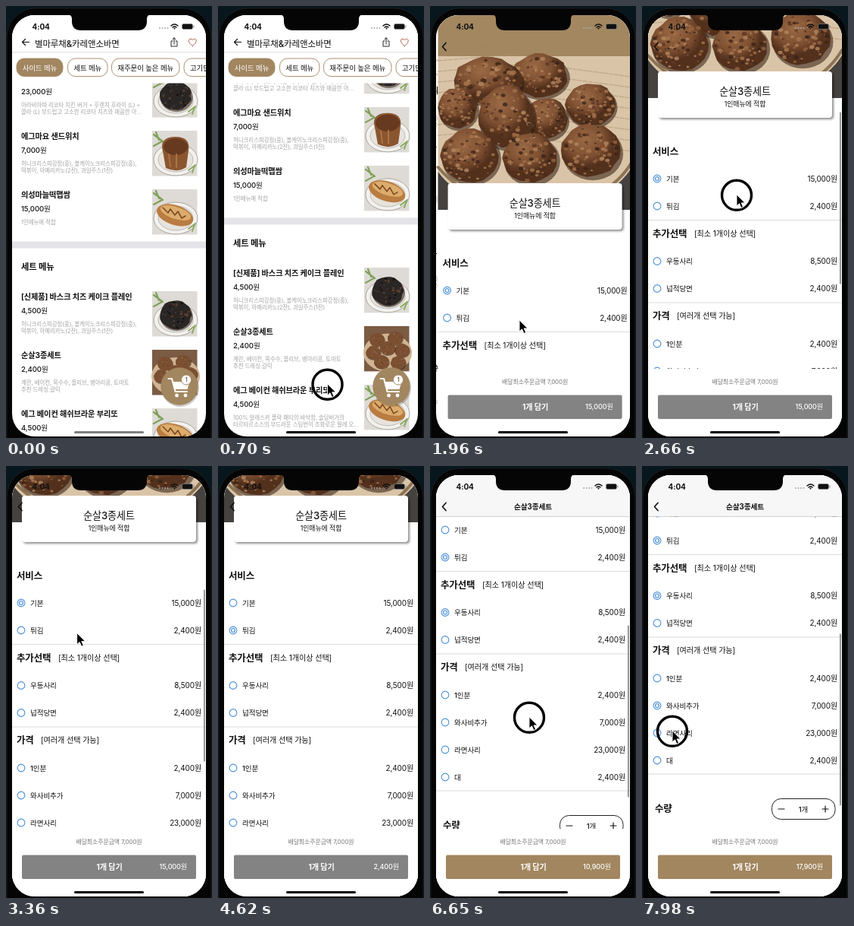
Animation, 272 px wide and 568 px high, one loop 8000 ms. Source, as an HTML page:

```html
<!DOCTYPE html>
<html lang="ko">
<head>
<meta charset="utf-8">
<title>메뉴 주문</title>
<style>
html, body { margin: 0; width: 100%; height: 100%; overflow: hidden; background: #08161d; }
svg { display: block; width: 272px; height: 568px; }
text { font-family: Inter, "Noto Sans CJK KR", "Noto Sans CJK", sans-serif; letter-spacing: -.01em; }
</style>
</head>
<body>
<svg id="stage" viewBox="0 0 272 568" xmlns="http://www.w3.org/2000/svg"></svg>
<script>
const LOOP = 8000, STEP = 70;
const BROWN = '#a1865f', BLUE = '#4a8fd8', PUSH_AT = 1592;
const TYPE_SCALE = .948; // Noto's Hangul is wider than the phone's own face

// ---- drawing helpers ----
function text(x, y, str, size, { w = 400, c = '#111', a = 'start', id = '' } = {}) {
  const s = size * TYPE_SCALE;
  return `<text ${id && `id="${id}"`} x="${x}" y="${y + s * .37}" font-size="${s}" font-weight="${w}" fill="${c}" text-anchor="${a}">${str}</text>`;
}
const rect = (x, y, w, h, fill, extra = '') =>
  `<rect x="${x}" y="${y}" width="${w}" height="${h}" fill="${fill}" ${extra}/>`;
const disc = (x, y, r, fill, extra = '') =>
  `<circle cx="${x}" cy="${y}" r="${r}" fill="${fill}" ${extra}/>`;
const oval = (x, y, rx, ry, fill, extra = '') =>
  `<ellipse cx="${x}" cy="${y}" rx="${rx}" ry="${ry}" fill="${fill}" ${extra}/>`;
const line = (d, c = '#111', w = 1.2, extra = '') =>
  `<path d="${d}" fill="none" stroke="${c}" stroke-width="${w}" stroke-linecap="round" stroke-linejoin="round" ${extra}/>`;
const rule = y => rect(8, y, 256, 1, '#dcdcdc');

let seed = 7;
const rnd = () => (seed = seed * 16807 % 2147483647) / 2147483647;

// A crumbly lump: bumpy outline with light and dark specks
function lump(x, y, rx, ry, fill, tones, specks) {
  let d = '';
  for (let i = 0; i < 22; i++) {
    const a = i / 22 * Math.PI * 2, k = .94 + rnd() * .1;
    d += `${i ? 'L' : 'M'}${(x + Math.cos(a) * rx * k).toFixed(1)} ${(y + Math.sin(a) * ry * k).toFixed(1)}`;
  }
  let out = oval(x + rx * .06, y + ry * .12, rx * 1.03, ry, '#2c1a10', 'opacity=".55"') +
    `<path d="${d}Z" fill="${fill}"/>`;
  for (let i = 0; i < specks; i++) {
    const a = rnd() * 6.28, k = Math.sqrt(rnd()) * .92, r = (.02 + rnd() * .05) * rx;
    out += oval((x + Math.cos(a) * rx * k).toFixed(1), (y + Math.sin(a) * ry * k).toFixed(1),
      (r * 1.3).toFixed(1), r.toFixed(1), tones[i % tones.length], 'opacity=".8"');
  }
  return out;
}

// ---- photos as simple shapes ----
const cookieTones = ['#a8764d', '#5c3823', '#b58660', '#94623e', '#3a2318'];
function heroPhoto() {
  let out = rect(8, 66, 256, 202, '#dac4a7');
  for (let i = 0; i < 16; i++)
    out += line(`M${8 + i % 2 * 150} ${72 + i * 7}l105 ${i % 2 ? 14 : -9}`, '#a98d6b', 1.4, 'stroke-dasharray="5 2" opacity=".5"');
  out += '<path d="M8 218Q40 262 120 268H8Z" fill="#45423f"/><path d="M264 212Q238 255 160 268H264Z" fill="#45423f"/>' +
    line('M8 212Q45 255 110 264M264 205Q240 246 180 264', '#8d7355', 4);
  const lumps = [[142, 91, 37, 29], [73, 98, 45, 31], [209, 130, 33, 28], [34, 134, 26, 27],
    [151, 148, 28, 27], [98, 145, 37, 41], [50, 197, 38, 35], [210, 190, 39, 35], [130, 200, 36, 33]];
  return out + lumps.map(l => lump(...l, 'url(#crumb)', cookieTones, 80)).join('');
}
function thumb(kind, y) {
  const x = 193, cx = x + 31, cy = y + 31;
  let out = rect(x, y, 59.5, 59.5, kind === 'pile' ? '#7b5b43' : '#dedbd6');
  if (kind === 'pile') {
    out += oval(cx, cy + 4, 32, 25, '#d0b493');
    for (const [dx, dy] of [[-14, -13], [10, -15], [-19, 4], [19, 1], [0, -2], [-8, 16], [14, 17]])
      out += lump(cx + dx, cy + dy, 10, 9, '#7b4f32', cookieTones, 14);
  } else {
    out += oval(cx, cy + 7, 29, 21, '#f3f1ed', 'stroke="#aaa69d"') + oval(cx, cy + 7, 23, 16, '#e7e3dc', 'stroke="#bbb"') +
      line(`M${x + 2} ${y + 5}l12 9m-9-12l4 10m-7 8l11-6`, '#7fa05a', 2.2) +
      line(`M${x + 48} ${y + 52}l9-7m-4 10l3-9`, '#8daa62', 2);
    if (kind === 'dark') out += lump(cx, cy, 21, 19, '#2a2625', ['#0f0e0e', '#4d433d', '#74462c'], 40);
    if (kind === 'bread') out += `<path d="M${cx - 17} ${cy - 4}q-5-18 15-19q22-1 19 18l-3 22q-12 8-27 1Z" fill="#8a5630"/>` +
      oval(cx, cy - 10, 16, 11, '#67391f') + line(`M${cx - 9} ${cy}l2 16m8-16v17`, '#aa7345', 2);
    if (kind === 'roll') out += oval(cx, cy + 3, 25, 13, '#b97c42', `transform="rotate(18 ${cx} ${cy})"`) +
      oval(cx, cy, 21, 8, '#dcac6c', `transform="rotate(18 ${cx} ${cy})"`) +
      line(`M${cx - 17} ${cy - 7}l7 7l3-5l6 8l4-5l5 9l5-3`, '#7d4a24', 1.6);
  }
  return out;
}

// ---- list page ----
function row(y, name, price, desc, kind) {
  return (name && text(20, y, name, 10.75, { w: 700 })) + text(20, y + 18.5, price + '원', 10.1, { w: 500 }) +
    desc.map((s, i) => text(20, y + 36 + i * 9, s, 7.87, { c: '#a3a3a3' })).join('') + thumb(kind, y - 7);
}
const sides = ['허니크리스피강정(중), 볼케이노크리스피강정(중),', '떡볶이, 아메리카노(2잔), 과일주스(1잔)'];
const listRows =
  row(94, '', '23,000', ['아라비아따 리코타 치킨 버거 + 후렌치 후라이 (L) +', '콜라 (L) 부드럽고 고소한 리코타 치즈와 매콤한 아…'], 'dark') +
  row(171, '에그마요 샌드위치', '7,000', sides, 'bread') +
  row(248, '의성마늘떡맵쌈', '15,000', ['1인메뉴에 적합'], 'roll') +
  rect(8, 309.5, 256, 9, '#e4e4e8') + text(20, 343, '세트 메뉴', 11.9, { w: 700 }) +
  row(382, '[신제품] 바스크 치즈 케이크 플레인', '4,500', sides, 'dark') +
  row(459, '순살3종세트', '2,400', ['계란, 베이컨, 옥수수, 올리브, 병아리콩, 토마토', '추천 드레싱:갈릭'], 'pile') +
  row(536, '에그 베이컨 해쉬브라운 부리또', '4,500', ['100% 알래스카 폴락 패티의 바삭함, 솔담버거의', '타르타르소스의 부드러운 스팀번이 조화로운 필레 오…'], 'roll') +
  row(613, '마파두부', '7,000', [], 'roll');

const tab = (x, w, label, on) =>
  rect(x, 69, w, 23.5, on ? BROWN : '#fff', `rx="10" stroke="${BROWN}" stroke-width=".9"`) +
  text(x + w / 2, 81, label, 10, { a: 'middle', w: 500, c: on ? '#fff' : '#111' });
const tabs = rect(8, 12, 256, 89.5, '#fff') + tab(14, 61, '사이드 메뉴', true) + tab(81.5, 52.5, '세트 메뉴') +
  tab(139.5, 89.5, '재주문이 높은 메뉴') + tab(235, 70, '고기만두 메뉴');

const listHead = `<g id="listHead">${rect(8, 12, 256, 54, '#fff')}${rect(8, 60.5, 256, .8, '#d4d4d4')}
  ${line('M30.500 47.500H21.500M25.500 43.500L21.500 47.500L25.500 51.500', '#111', 1.1)}
  ${text(38, 49.8, '별마루채&amp;카레앤소바면', 12.1, { w: 500 })}
  ${line('M220 46H218V53H226V46H224M222 50V41.800M219.800 44L222 41.800L224.200 44', '#111', .9)}
  ${line('M246.300 52.500C238 47 241.500 40.500 246.300 44.500C251 40.500 254.500 47 246.300 52.500Z', '#a8503c', .9)}</g>`;

const cart = disc(230, 502, 25, '#000', 'opacity=".2"') + disc(229, 500, 24.7, BROWN) +
  line('M214.500 490H219L223.500 507H239', '#fff', 2) +
  '<path d="M220 494H242.500L239.500 504H223Z" fill="#fff"/>' +
  disc(225.5, 512, 2.4, '#fff') + disc(237, 512, 2.4, '#fff') +
  disc(238, 491.5, 6.6, '#fff', `stroke="${BROWN}"`) + text(238, 491.5, '1', 8, { a: 'middle', c: '#7b6545', w: 600 });

// ---- detail page ----
const options = [['기본', '15,000', 374], ['튀김', '2,400', 410], ['우동사리', '8,500', 482.5], ['넙적당면', '2,400', 518.5],
  ['1인분', '2,400', 591], ['와사비추가', '7,000', 627], ['라면사리', '23,000', 663], ['대', '2,400', 699]];
const option = ([name, price, y], i) =>
  disc(20, y, 4.9, '#fff', `stroke="${BLUE}" stroke-width="1.1"`) +
  disc(20, y, 2.5, '#eaf2fc', `id="dot${i}" stroke="${BLUE}" stroke-width="1.1"`) +
  text(32, y, name, 10.1, { w: 500 }) + text(258, y, price + '원', 10.5, { a: 'end' });
const group = (y, name, hint, x) =>
  text(14, y, name, 13.2, { w: 700 }) + (hint ? text(x, y, hint, 10.7) : '');

const detailBody = rect(8, -120, 256, 186, BROWN) + heroPhoto() +
  rect(23, 236, 230, 60, '#000', 'rx="4" opacity=".45" filter="url(#soft)"') + rect(21, 233, 230, 61, '#fff', 'rx="4"') +
  text(136, 259, '순살3종세트', 13.8, { a: 'middle', w: 500 }) + text(136, 276, '1인매뉴에 적합', 9.4, { a: 'middle' }) +
  group(338, '서비스') + rule(428) + group(446, '추가선택', '[최소 1개이상 선택]', 69) +
  rule(536.5) + group(554.5, '가격', '[여러개 선택 가능]', 46) + options.map(option).join('') + rule(716.5) +
  text(17, 762.5, '수량', 13.2, { w: 700 }) +
  rect(171.5, 749.5, 83.5, 27, '#fff', 'rx="12" stroke="#222" stroke-width="1"') +
  line('M180 763H188M238 763H246M242 759V767') + text(213, 763, '1개', 10, { a: 'middle', w: 500 });

const detail = `<g id="detail">${rect(8, 12, 256, 556, '#fff')}<g id="body">${detailBody}</g>
  ${rect(261, 0, 1.8, 226, '#8a8a8a', 'id="bar" rx=".9"')}
  ${rect(8, 477, 256, 91, '#fff')}${text(136, 494, '배달최소주문금액 7,000원', 8.35, { a: 'middle', c: '#777' })}
  ${rect(21, 511.5, 230, 31.5, '#838383', 'id="button" rx="2"')}${text(136.5, 527, '1개 담기', 10.7, { a: 'middle', w: 700, c: '#fff' })}
  ${text(239, 527, '', 9.5, { a: 'end', w: 500, c: '#fff', id: 'total' })}</g>`;

const navFill = rect(8, 12, 256, 54, '#f7f7f8') + rect(8, 66, 256, .8, '#c9c9cc');
const nav = `<g id="fromNav">${navFill}${text(26, 53.5, '카페 • 디저트', 10, { w: 500 })}</g>
  <g id="titleNav">${navFill}${text(136, 53.5, '순살3종세트', 10.2, { a: 'middle', w: 700 })}</g>
  ${line('M21 48.500L16.500 53.500L21 58.500', '#111', 1.7, 'id="back"')}`;

const status = text(34.5, 27, '4:04', 10.6, { w: 700 }) +
  [203, 206.5, 210, 213.5].map(x => disc(x, 29, 1, '#aaa')).join('') +
  line('M218 26Q222.500 22 227 26M220 28Q222.500 26 225 28', '#111', 1.5) + disc(222.5, 29.6, 1.1, '#111') +
  rect(232.5, 23.5, 14, 7, '#111', 'rx="2" stroke="#888" stroke-width=".7"') + rect(247.5, 25.5, 1, 3, '#888');

const stage = document.getElementById('stage');
stage.innerHTML = `<defs>
  <clipPath id="screen"><rect x="8" y="12" width="256" height="554" rx="30"/></clipPath>
  <filter id="soft" x="-10%" y="-20%" width="120%" height="150%"><feGaussianBlur stdDeviation="1.6"/></filter>
  <radialGradient id="crumb" cx=".4" cy=".3"><stop offset="0" stop-color="#9b6a45"/><stop offset=".65" stop-color="#7d4f31"/><stop offset="1" stop-color="#52301c"/></radialGradient></defs>
  ${rect(0, 0, 272, 568, '#08161d')}${rect(1, 3, 270, 620, '#050505', 'rx="38" stroke="#1a1d20"')}
  <g clip-path="url(#screen)">${rect(8, 12, 256, 556, '#fff')}
    <g id="list"><g id="rows">${listRows}</g>${tabs}${cart}</g>${listHead}${detail}${nav}${status}
    ${rect(90, 559, 92, 3, '#000', 'id="home" rx="1.5"')}</g>
  <path d="M82 11Q87 12 87 17V20Q87 32 99 32H174Q186 32 186 20V17Q186 12 191 11Z" fill="#050505"/>
  <g id="pointer">${disc(0, .8, 19.5, 'none', 'id="ring" stroke="#000" stroke-width="3.4"')}
    <path d="M0 0V15L3.500 11.800L6 17.500L8.600 16.300L6.100 10.900H11Z" fill="#000" stroke="#fff" stroke-width=".9"/></g>`;

// ---- motion ----
const $ = id => document.getElementById(id);
const clamp = (v, a, b) => Math.min(b, Math.max(a, v));
const within = (t, spans) => spans.some(([a, b]) => t >= a && t < b);
const move = (el, x, y) => el.setAttribute('transform', `translate(${x.toFixed(2)} ${y.toFixed(2)})`);
const show = (id, v) => $(id).setAttribute('opacity', +v);

// time, x, y of the pointer tip
const path = [[70, 228, 262], [210, 141, 545], [350, 142, 545], [910, 146, 468], [1120, 146, 466], [1330, 118, 413],
  [2240, 118, 413], [2660, 125, 248], [3010, 124, 201], [3220, 124, 202], [3640, 33, 255], [3850, 29, 217],
  [4760, 29, 217], [5110, 8, 262], [5320, 23, 300], [5600, 20, 290], [5950, 20, 289], [6230, 120, 442],
  [6370, 120, 442], [6650, 131, 330], [7140, 134, 308], [7420, 39, 316], [7630, 39, 316], [7770, 40, 348], [8000, 40, 348]];
const presses = [[350, 1050], [1330, 1540], [2240, 3010], [3850, 4200], [5320, 5670], [6370, 7140], [7420, 7630], [7910, 8000]];
const hidden = [[0, 70], [3080, 3150], [4620, 4690]];

function tip(t) {
  const i = clamp(path.findIndex(p => p[0] > t), 1, path.length - 1);
  const [a, b] = [path[i - 1], path[i]], k = clamp((t - a[0]) / (b[0] - a[0]), 0, 1);
  return [a[1] + (b[1] - a[1]) * k, a[2] + (b[2] - a[2]) * k];
}
// Content follows the finger after a short slop
const drag = (t, from, to, y0) => Math.max(0, y0 - tip(clamp(t, from, to))[1]);
const spring = s => s <= 0 ? 0 : 1 - (1 + 18 * s) * Math.exp(-18 * s);

function draw(t) {
  const pushed = t >= PUSH_AT, p = spring((t - PUSH_AT) / 1000);
  const listScroll = drag(t, 350, 910, 528);
  const scroll = drag(t, 2240, 3010, 395) + drag(t, 6370, 7140, 426);

  move($('rows'), 0, -listScroll);
  move($('list'), -76.8 * p, 0);
  move($('detail'), 256 * (1 - p), 0);
  move($('body'), 0, -scroll);
  show('listHead', !pushed);
  show('detail', pushed);
  show('back', pushed);
  show('fromNav', pushed ? 1 - p : 0);
  show('titleNav', clamp((scroll - 202) / 40, 0, 1));
  show('home', listScroll < 30 ? .5 : 1);

  $('bar').setAttribute('y', 67.5 + .49 * scroll);
  show('bar', t < 2240 ? 0 : t < 6370 ? clamp((4000 - t) / 280, 0, 1) : 1);

  const fried = t >= 4130, udon = t >= 5600, wasabi = t >= 7560;
  [!fried, fried, udon, false, false, wasabi, false, false].forEach((on, i) => show('dot' + i, on));
  $('button').setAttribute('fill', udon ? BROWN : '#838383');
  const total = (fried ? 2400 : 15000) + (udon ? 8500 : 0) + (wasabi ? 7000 : 0);
  $('total').textContent = total.toLocaleString('en-US') + '원';

  move($('pointer'), ...tip(t));
  show('pointer', !within(t, hidden));
  show('ring', within(t, presses));
}

const start = performance.now();
function tick() {
  const t = (performance.now() - start) % LOOP;
  draw(Math.floor(t / STEP) * STEP);
  requestAnimationFrame(tick);
}
tick();
</script>
</body>
</html>
```
